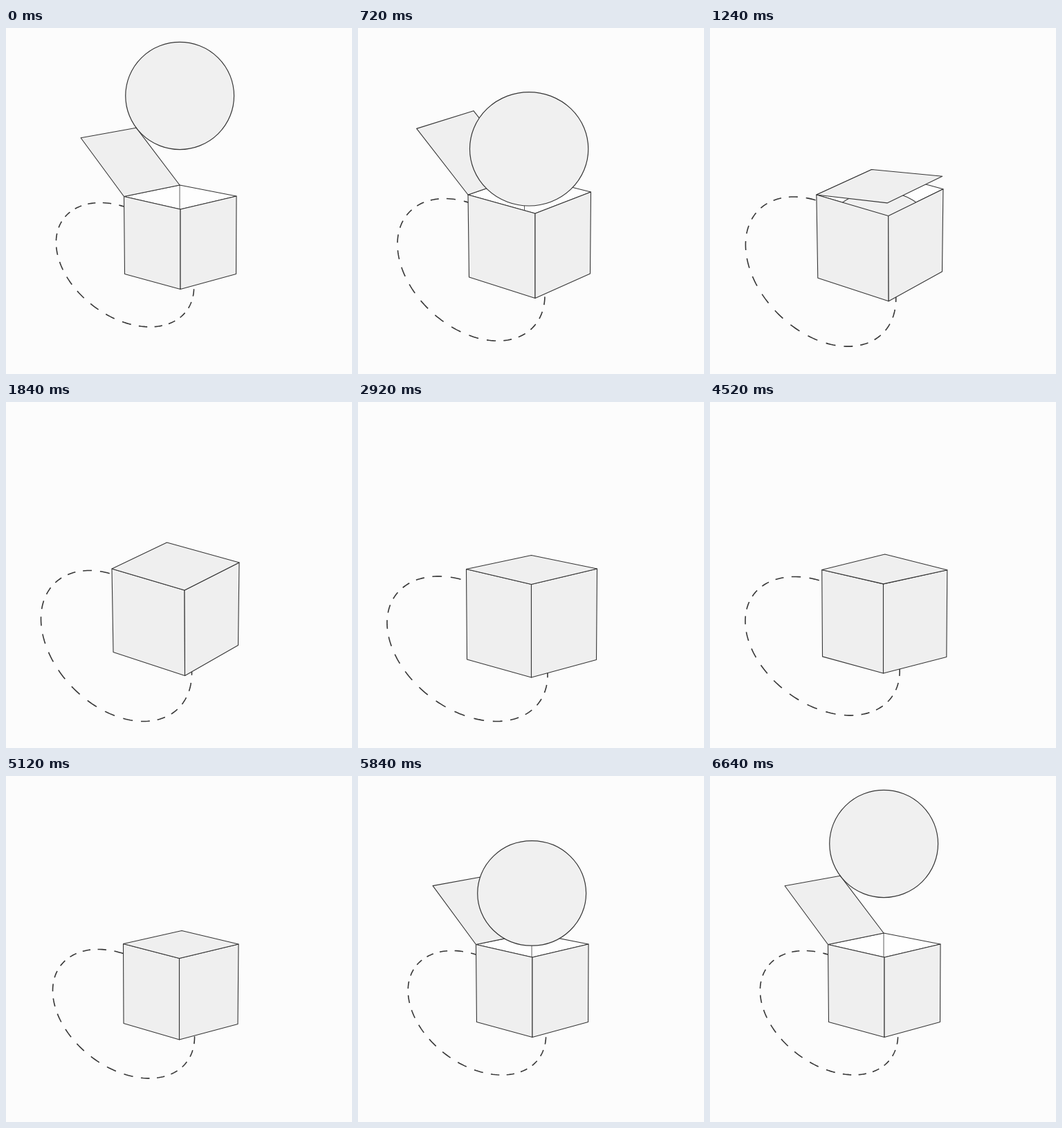
An HTML page with a canvas that plays this animation: 500 by 500 pixels, repeating every 6680 ms.

```html
<!DOCTYPE html>
<html lang="en">
<head>
<meta charset="utf-8">
<title>Ball in a box</title>
<style>
  html, body { margin: 0; width: 100%; height: 100%; overflow: hidden; background: #fcfcfc; }
  canvas { display: block; width: 500px; height: 500px; }
</style>
</head>
<body>
<canvas id="stage" width="500" height="500"></canvas>
<script>
const LOOP = 6680, STEP = 40;
const INK = '#363636', FACE = '#efefef', PAPER = '#fcfcfc';
const ctx = document.getElementById('stage').getContext('2d');

// Top corners left, back, front, right; bottom corners left, front, right;
// then the ring: centre, half extents, dash phase in degrees.
const open = [170.5, 243.5, 251, 227, 252, 262, 333, 243,
  171.5, 355.5, 252, 377.5, 332.5, 355.5, 172, 342.2, 99.6, 89.7, -95];
const grown = [159, 241, 240.5, 213, 256, 268, 336.5, 237,
  160.5, 360, 256, 390.5, 335.5, 355, 163.5, 349.3, 106.5, 102.8, -95.7];
const tilted = [153, 241, 232.5, 203, 258, 272, 337, 232,
  155, 361.5, 258.5, 395.5, 335.5, 351.5, 159.5, 352.5, 109, 109, -102.5];
const flat = [156.5, 241.5, 250.5, 221.5, 250.5, 263.5, 345.5, 241,
  157.5, 372, 250.5, 398, 344.5, 372.5, 158, 356.7, 116, 104.8, -102];
const rest = [157.5, 242.5, 252, 223.5, 250.5, 262.5, 346.5, 242.5,
  158.5, 373.5, 250.5, 398, 345.5, 374, 158.5, 357.5, 116.5, 104, -101];
const small = [169.5, 242.5, 254, 223.5, 250.5, 263.5, 336, 243,
  170, 357.5, 250.5, 381, 335, 358.5, 170, 343.7, 102.5, 93.2, -97.6];

const mix = (a, b, p) => a.map((v, i) => v + (b[i] - v) * p);
const shrinking = mix(rest, small, 0.65);
shrinking[3] -= 5;

const keys = [
  [0, open], [720, grown], [1360, mix(grown, tilted, 0.93)], [1840, tilted],
  [2040, mix(tilted, flat, 0.18)], [2720, flat], [2920, flat],
  [3880, rest], [4120, rest], [4760, shrinking], [5120, small],
  [5440, mix(small, open, 0.75)], [6000, open], [LOOP, open]
];

// Monotone cubic through the keys, so nothing overshoots a pose.
function slope(k, i) {
  if (k < 1 || k > keys.length - 2) return 0;
  const rate = n => (keys[n + 1][1][i] - keys[n][1][i]) / (keys[n + 1][0] - keys[n][0]);
  const a = rate(k - 1), b = rate(k);
  return a * b > 0 ? 2 * a * b / (a + b) : 0;
}

function poseAt(t) {
  let k = 0;
  while (k < keys.length - 2 && t >= keys[k + 1][0]) k++;
  const [t0, from] = keys[k], [t1, to] = keys[k + 1];
  const d = t1 - t0, p = (t - t0) / d, q = 1 - p;
  return from.map((v, i) =>
    v * (1 + 2 * p) * q * q + to[i] * p * p * (3 - 2 * p) +
    d * p * q * (q * slope(k, i) - p * slope(k + 1, i)));
}

const span = (t, a, b) => Math.min(1, Math.max(0, (t - a) / (b - a)));
const sine = p => (1 - Math.cos(Math.PI * p)) / 2;

// Ball height above the rim, in ball radii.
function ballHeight(t) {
  if (t < 3000) return 1.853 - 2.753 * span(t, 225, 1007) ** 2;
  const rise = 1 - (1 - span(t, 5500, 6320)) ** 2;
  return -0.9 + 2.8 * rise - 0.047 * sine(span(t, 6320, 6640));
}

function lidAngle(t) {
  const p = t < 3000 ? 1 - sine(span(t, 930, 1300)) : sine(span(t, 5190, 5700));
  return p * 140 * Math.PI / 180;
}

function paint(fill, width = 1.1) {
  if (fill) { ctx.fillStyle = fill; ctx.fill(); }
  ctx.strokeStyle = INK;
  ctx.lineWidth = width;
  ctx.stroke();
}

function trace(points) {
  ctx.beginPath();
  points.forEach(([x, y]) => ctx.lineTo(x, y));
  ctx.closePath();
}

function face(fill, ...points) {
  trace(points);
  paint(fill);
}

// A circle seen at a slant; dashes are even around the circle.
function ring(cx, cy, a, b, phase) {
  const count = 26, skew = Math.asin(0.36), turn = 2 * Math.PI / count;
  ctx.beginPath();
  for (let i = 0; i < count; i++) {
    const start = phase * Math.PI / 180 + i * turn;
    for (let j = 0; j <= 4; j++) {
      const r = start + turn * 0.53 * j / 4;
      const x = cx + a * Math.cos(r), y = cy + b * Math.sin(r + skew);
      j ? ctx.lineTo(x, y) : ctx.moveTo(x, y);
    }
  }
  paint(null, 1.6);
}

function ball(left, front, right, h) {
  const half = (right[0] - left[0]) / 2, rx = half * 0.965;
  const ry = rx * (0.96 + 0.03 * (h - 0.75) / 1.1);
  const cx = left[0] + half - 0.6, cy = (left[1] + right[1]) / 2 - h * rx;
  ctx.save();
  trace([[0, 0], [500, 0], [500, right[1]], right, front, left, [0, left[1]]]);
  ctx.clip();
  ctx.beginPath();
  ctx.ellipse(cx, cy, rx, ry, 0, 0, 2 * Math.PI);
  paint('#f0f0f0', 1.2);
  ctx.restore();
}

function draw(t) {
  const pose = poseAt(t);
  const at = i => [pose[2 * i], pose[2 * i + 1]];
  const [left, back, front, right, lowLeft, lowFront, lowRight] = [0, 1, 2, 3, 4, 5, 6].map(at);
  const angle = lidAngle(t), wide = angle > Math.PI / 2;
  const tall = lowLeft[1] - left[1];

  const swing = (hinge, edge) => [
    hinge[0] + (edge[0] - hinge[0]) * Math.cos(angle),
    hinge[1] + (edge[1] - hinge[1]) * Math.cos(angle) - 0.98 * tall * Math.sin(angle)
  ];
  const lid = () => face(FACE, left, back, swing(back, right), swing(left, front));

  ctx.fillStyle = PAPER;
  ctx.fillRect(0, 0, 500, 500);
  ctx.lineJoin = 'round';
  ring(...pose.slice(14));

  if (angle > 0) {
    face('#fefefe', left, back, right, front);
    ctx.beginPath();
    ctx.moveTo(...back);
    ctx.lineTo(back[0], back[1] + tall * 0.8);
    paint(null, 0.8);
    if (wide) lid();
    ball(left, front, right, ballHeight(t));
  }
  face(FACE, left, front, lowFront, lowLeft);
  face(FACE, front, right, lowRight, lowFront);
  if (!wide) lid();
}

const begin = performance.now();
function tick() {
  const t = (performance.now() - begin) % LOOP;
  draw(Math.floor(t / STEP) * STEP);
  requestAnimationFrame(tick);
}
tick();
</script>
</body>
</html>
```
